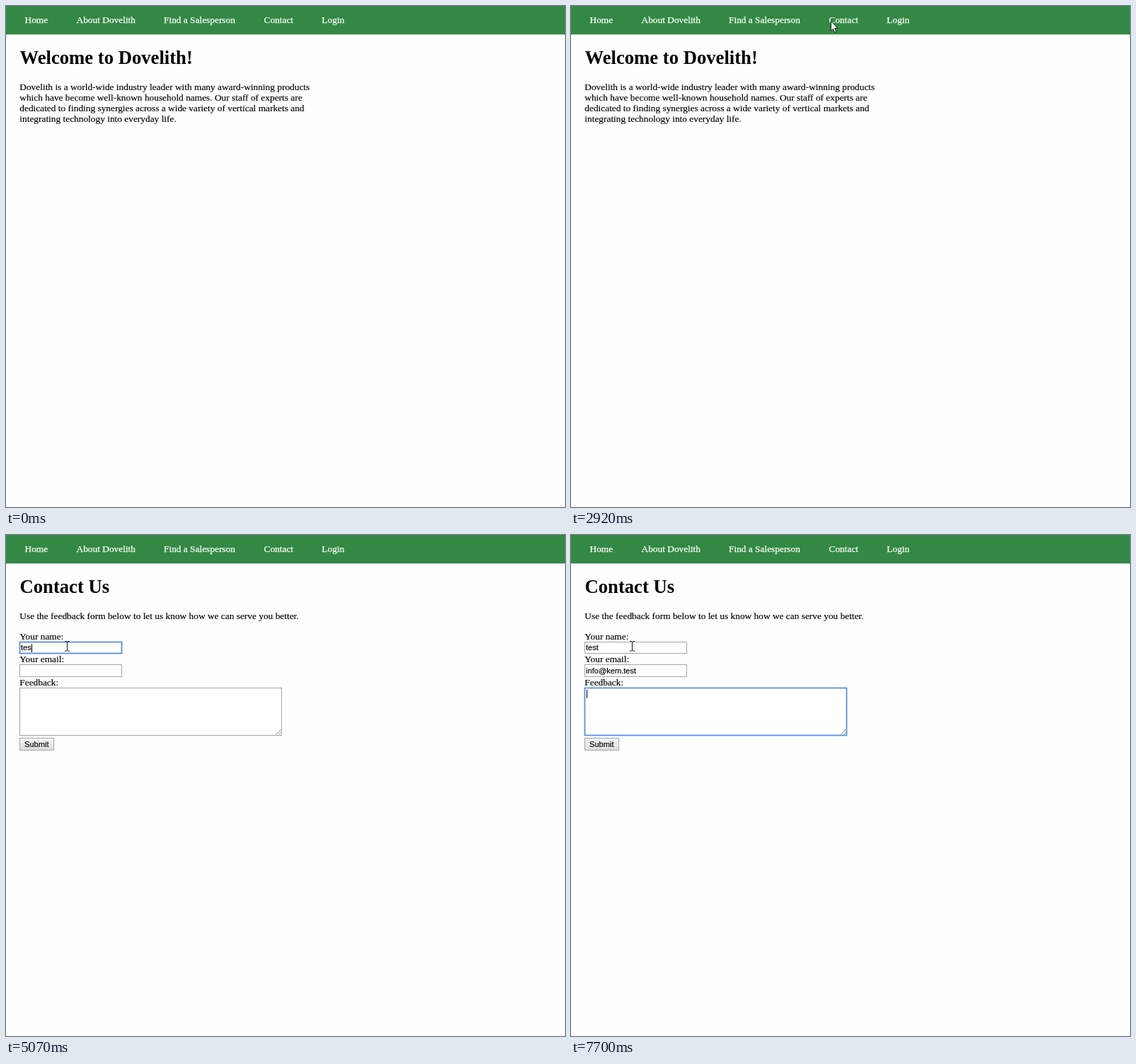
These frames come from a looping animation (790 px wide and 709 px high, 8 s). An HTML page:

```html
<!DOCTYPE html>
<html lang="en">
<head>
<meta charset="utf-8">
<title>Contact form demo</title>
<style>
  html, body { margin: 0; width: 100%; height: 100%; overflow: hidden; background: #fefefe; }
  svg { display: block; width: 100%; height: 100%; }
  text { font: 13.36px "Liberation Serif", "Times New Roman", serif; stroke: #000; stroke-width: .15; }
  .title { font-size: 26.667px; font-weight: bold; stroke: none; }
  .nav text { fill: #fff; stroke: #fff; stroke-width: .25; }
  .ui { font: 11.111px "Liberation Sans", Arial, sans-serif; }
  .box { fill: #fff; stroke: #a6a6a6; }
  .box.focus { stroke: #5a8fe0; stroke-width: 1.8; }
  .hidden { display: none; }
</style>
</head>
<body>
<svg viewBox="0 0 790 709">
  <defs>
    <linearGradient id="face" x2="0" y2="1">
      <stop stop-color="#f7f7f7"/><stop offset="1" stop-color="#dcdcdc"/>
    </linearGradient>
  </defs>

  <rect width="790" height="40.3" fill="#384"/>
  <g class="nav">
    <text x="26.5" y="24">Home</text>
    <text x="99.5" y="24">About Dovelith</text>
    <text x="223" y="24">Find a Salesperson</text>
    <text x="364.5" y="24">Contact</text>
    <text x="446.3" y="24">Login</text>
  </g>

  <g id="home">
    <text class="title" x="19.5" y="82">Welcome to Dovelith!</text>
    <text x="19.3" y="119">Dovelith is a world-wide industry leader with many award-winning products</text>
    <text x="19.3" y="134">which have become well-known household names. Our staff of experts are</text>
    <text x="19.3" y="149">dedicated to finding synergies across a wide variety of vertical markets and</text>
    <text x="19.3" y="164">integrating technology into everyday life.</text>
  </g>

  <g id="contact">
    <text class="title" x="19.5" y="82">Contact Us</text>
    <text x="19.3" y="119">Use the feedback form below to let us know how we can serve you better.</text>
    <text x="19.3" y="147.5">Your name:</text>
    <text x="19.3" y="180">Your email:</text>
    <text x="19.3" y="213">Feedback:</text>
    <rect class="box" id="nameBox" x="19.5" y="151.5" width="144" height="16"/>
    <rect class="box" id="emailBox" x="19.5" y="183.5" width="144" height="17"/>
    <rect class="box" id="feedbackBox" x="19.5" y="216.5" width="370" height="67"/>
    <path d="M381.5 282.5l7-7m-3 7l3-3" stroke="#777" stroke-width=".9"/>
    <rect x="19.5" y="287.5" width="48" height="17" fill="url(#face)" stroke="#a6a6a6"/>
    <text class="ui" x="43.3" y="300" text-anchor="middle">Submit</text>
    <text class="ui" id="name" x="21" y="163.3"/>
    <text class="ui" id="email" x="21" y="196"/>
    <text class="ui" id="feedback" x="21" y="229"/>
    <rect id="caret" width="1" height="12"/>
  </g>

  <path id="arrow" d="M.5.5V14.2L3.5 11.4 5.7 16.3 7.8 15.4 5.6 10.5H9.9Z" fill="#fff" stroke="#111" stroke-width=".9"/>
  <path id="beam" d="M-3-6.5h2.2L.5-5.5 1.8-6.5H4M.5-5.5v12M-3 7.2h2.2L.5 6.2 1.8 7.2H4" fill="none" stroke="#111"/>
</svg>
<script>
const LOOP = 8000, PAGE_AT = 3990, BLINK = 560, CAPTURE_STEP = 135;

// The pointer enters from off stage, then follows one eased curve per gesture.
const ENTRY = [313, -123];
const GESTURES = [
  { from: 500, to: 800, bend: [224, -12], end: [135, 98] },
  { from: 1080, to: 1890, bend: [321, 47], end: [458, 19] },
  { from: 2140, to: 2410, bend: [392, -10], end: [305, 30] },
  { from: 2540, to: 3070, bend: [340, 30], end: [380, 17] },
  { from: 3320, to: 4260, bend: [265, 288], end: [115, 190] },
  { from: 4380, to: 4680, bend: [54, 171], end: [86, 157] }
];

const FIELDS = [
  { id: "name", focus: 4680, text: "test", from: 4800, to: 5190 },
  { id: "email", focus: 5910, text: "info@kem.test", from: 6310, to: 7550 },
  { id: "feedback", focus: 7700, text: "", from: LOOP, to: LOOP }
];

const el = id => document.getElementById(id);
const show = (id, on) => el(id).classList.toggle("hidden", !on);
const easeOut = p => 1 - (1 - p) ** 2;
const curve = (a, b, c, u) => a * (1 - u) ** 2 + 2 * b * u * (1 - u) + c * u * u;

function pointerAt(t) {
  let point = ENTRY;
  for (const { from, to, bend, end } of GESTURES) {
    if (t < from) break;
    const gaps = Math.round((to - from) / CAPTURE_STEP);
    const step = Math.floor((t - from) / (to - from) * gaps) + 1;
    const u = easeOut(Math.min(1, step / (gaps + 1)));
    point = point.map((start, axis) => curve(start, bend[axis], end[axis], u));
  }
  return point;
}

function typedText({ text, from, to }, t) {
  if (t < from) return "";
  return text.slice(0, 1 + Math.floor((t - from) / (to - from) * (text.length - 1)));
}

function drawForm(t) {
  const active = FIELDS.filter(field => t >= field.focus).pop();
  for (const field of FIELDS) {
    el(field.id).textContent = typedText(field, t);
    el(field.id + "Box").classList.toggle("focus", field === active);
  }
  show("caret", active && t < active.to + BLINK);
  if (!active) return;
  el("caret").setAttribute("x", Math.round(21.5 + el(active.id).getComputedTextLength()));
  el("caret").setAttribute("y", +el(active.id + "Box").getAttribute("y") + 2.5);
}

function draw() {
  const t = performance.now() % LOOP;
  const onForm = t >= PAGE_AT;
  show("home", !onForm);
  show("contact", onForm);
  show("arrow", !onForm);
  show("beam", onForm);
  drawForm(t);
  const [x, y] = pointerAt(t).map(Math.round);
  el(onForm ? "beam" : "arrow").setAttribute("transform", `translate(${x} ${y})`);
  requestAnimationFrame(draw);
}
draw();
</script>
</body>
</html>
```
